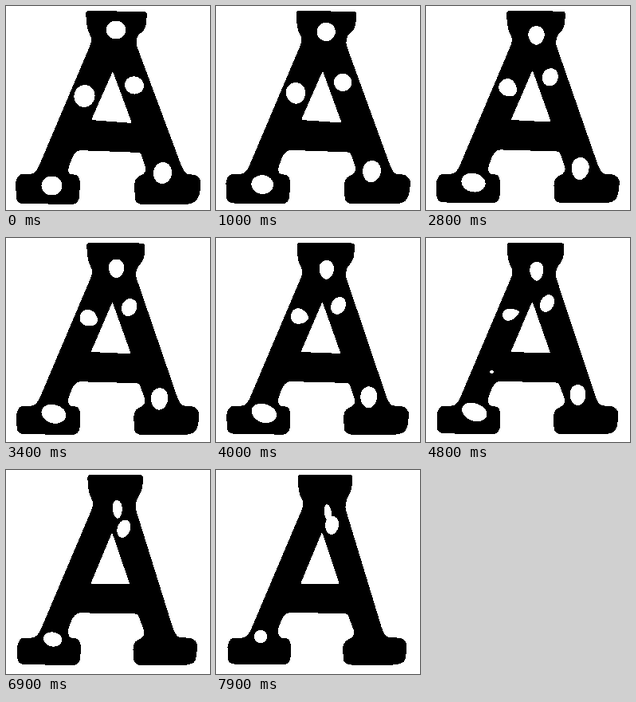
Write an HTML page that moves like this. It is 256x256 px and loops after 8000 ms.

```html
<!DOCTYPE html>
<html lang="en">
<head>
<meta charset="utf-8">
<title>Letter A</title>
<style>
  html, body { margin: 0; width: 100%; height: 100%; overflow: hidden; background: #fff; }
  svg { display: block; width: 100vw; height: 100vh; }
</style>
</head>
<body>
<svg viewBox="0 0 256 256" shape-rendering="crispEdges">
  <path id="letter" fill="#000"/>
  <path id="holes" fill="#fff"/>
</svg>
<script>
const LOOP = 8000, STEP = 100, LAST = LOOP - STEP;

// Runs of outline points, clockwise: total drift x, y, then the points.
const body = [
  [2.5,0, 100,6],
  [-5.5,-1, 177,7, 176,24, 173,31],
  [-1,0, 165,37, 163,47],
  [-12,-1.5, 221,203, 226,211],
  [-5,-1, 239,212, 245,219, 243,237],
  [-2,-4.5, 238,246, 228,249, 168,249, 162,245],
  [-2,-.5, 161,222, 164,215, 173,211, 176,205],
  [-4,-4, 169,184],
  [-1,-2, 90,181, 84,188, 78,204],
  [1,-.5, 79,211, 90,212, 93,219],
  [1.5,-4.5, 92,243, 87,249, 18,248, 13,244],
  [2.5,-.5, 12,219, 17,211, 34,211, 40,204],
  [2.3,0, 107,46, 107,39, 103,32, 101,22]
];
const counter = [[-1,-4, 134,82], [-3,-4, 158,147], [-1,0, 107,143]];

// Keys: time, cx, cy, rx, ry, tilt in degrees, taper toward the local +y end.
const topHole = [
  [0, 138,30, 12.5,11.5, 0,0], [5900, 139,44.5, 7.5,12, 0,.2], [7900, 140.5,54, 4.5,11, -8,0]
];
const leftHole = [
  [0, 98.5,113, 13,14, 15,0], [4000, 105,98.5, 9.5,11, -75,.2],
  [4800, 106.5,95.5, 7,10.5, -105,.35], [5700, 108,92, 0,0, -105,.35]
];
const rightHole = [
  [0, 161,99.5, 12,11, 15,0], [5900, 150,78, 7.5,11.5, 32,0], [7900, 145.5,69.5, 8.5,11.5, 8,.1]
];
const leftFootHole = [
  [0, 57.5,225.5, 13,12, 0,0], [4400, 60.5,219.5, 16.5,11.5, 20,.05],
  [5900, 61,216, 15.5,10, 20,.05], [7900, 56,209, 8,8, 0,0]
];
const rightFootHole = [
  [0, 196.5,209.5, 11.5,13.5, 10,0], [2800, 193.5,204, 11,14, 5,.08],
  [4800, 190.5,197, 10,13, 0,.05], [5700, 189,193, 0,0, 0,0]
];
const holes = [topHole, leftHole, rightHole, leftFootHole, rightFootHole];

const mix = (a, b, k) => a.map((v, i) => v + (b[i] - v) * k);
const fix = ([x, y]) => x.toFixed(2) + ' ' + y.toFixed(2);

function sample(keys, t) {
  const i = keys.findIndex(key => key[0] >= t);
  if (i < 0) return keys[keys.length - 1];
  if (i === 0) return keys[0];
  const a = keys[i - 1], b = keys[i];
  return mix(a, b, (t - a[0]) / (b[0] - a[0]));
}

function drifted(runs, k) {
  return runs.flatMap(([dx, dy, ...coords]) => {
    const points = [];
    for (let i = 0; i < coords.length; i += 2) {
      points.push([coords[i] + dx * k, coords[i + 1] + dy * k]);
    }
    return points;
  });
}

function roundedPolygon(points, radius) {
  const n = points.length;
  const toward = (p, q) => {
    const length = Math.hypot(q[0] - p[0], q[1] - p[1]);
    return fix(mix(p, q, Math.min(radius / length, 0.5)));
  };
  return points.map((p, i) => {
    const before = points[(i + n - 1) % n], after = points[(i + 1) % n];
    return `${i ? 'L' : 'M'}${toward(p, before)}Q${fix(p)} ${toward(p, after)}`;
  }).join('') + 'Z';
}

function blob([, cx, cy, rx, ry, tilt, taper]) {
  if (rx < 0.3) return '';
  const a = tilt * Math.PI / 180, c = Math.cos(a), s = Math.sin(a), n = 40;
  const points = Array.from({ length: n }, (_, i) => {
    const u = i / n * 2 * Math.PI, v = Math.sin(u);
    const x = rx * Math.cos(u) * (1 - taper * v), y = ry * v;
    return fix([cx + x * c - y * s, cy + x * s + y * c]);
  });
  return 'M' + points.join('L') + 'Z';
}

// A brief nick in the left leg.
function speck(t) {
  const size = Math.max(0, 1 - Math.abs(t - 4800) / 300);
  return blob([t, 82.5, 168, 2.5 * size, 1.8 * size, 20, 0]);
}

const letter = document.getElementById('letter');
const openings = document.getElementById('holes');

function draw(t) {
  const k = t / LAST;
  letter.setAttribute('d', roundedPolygon(drifted(body, k), 4));
  openings.setAttribute('d',
    roundedPolygon(drifted(counter, k), 2) +
    holes.map(keys => blob(sample(keys, t))).join('') + speck(t));
}

const start = performance.now();
function tick() {
  const t = (performance.now() - start) % LOOP;
  draw(Math.floor(t / STEP) * STEP);
  requestAnimationFrame(tick);
}
tick();
</script>
</body>
</html>
```
